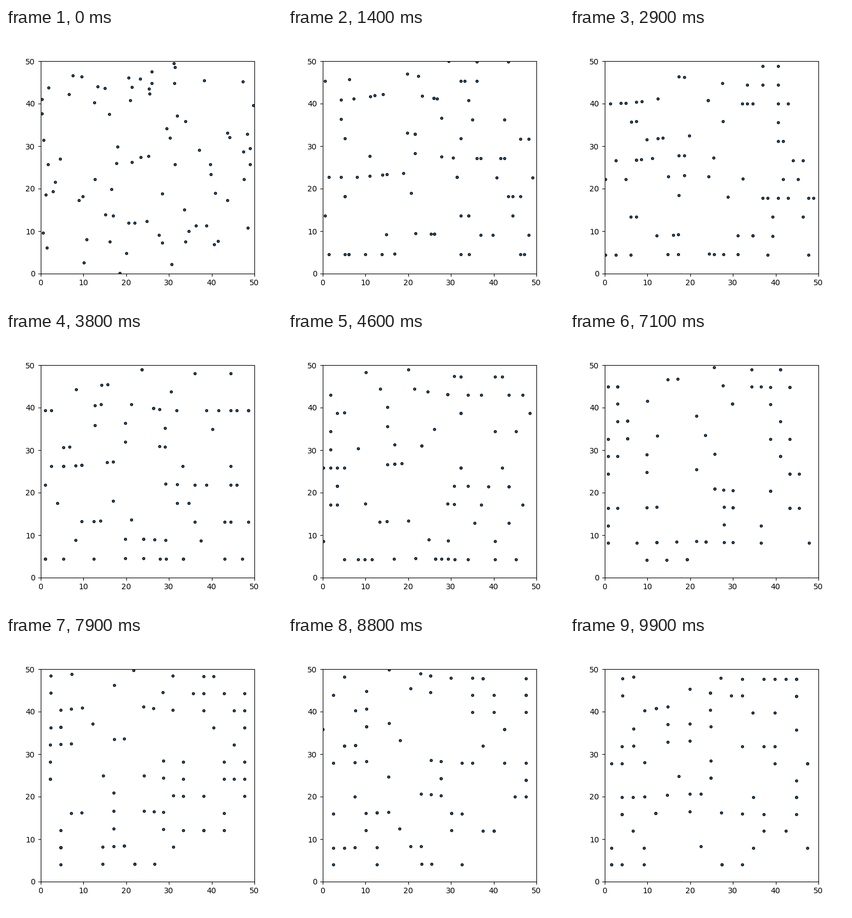
A matplotlib script for the animation above (10000 ms loop, 500x500 px).

```python
import numpy as np
import matplotlib.pyplot as plt
from matplotlib.animation import FuncAnimation

FRAMES = 100
INTERVAL = 100
SIZE = 50
COUNT = 80
SETTLE = 10  # frames until all dots sit on the grid

rng = np.random.default_rng(7)
start = rng.uniform(0, SIZE, (COUNT, 2))
steps = rng.normal(0, 1.5, (FRAMES, COUNT, 2))
steps[0] = 0
walk = start + np.cumsum(steps, axis=0)
walk = SIZE - np.abs(SIZE - walk % (2 * SIZE))  # bounce off the walls


def ease(u):
    return (1 - np.cos(np.pi * np.clip(u, 0, 1))) / 2


def swell(x, y):
    """A soft ridge, leaning left, that lifts the rows."""
    return np.exp(-((x - 22 + .12 * y) / 8) ** 2)


def grid(x, y, u):
    """Nearest crossing of a grid whose columns widen and rows close up."""
    col = .85 + 1.7 * u
    row = 4.56 - .59 * u
    last = np.floor(SIZE / col)
    gx = SIZE - col * np.clip(np.round((SIZE - x) / col), 1, last)
    gy = row * np.clip(np.round(y / row), 1, np.floor(SIZE / row))
    ridge = swell(gx, gy)
    return gx + .6 * ridge, gy * (1 + .043 * ridge)


def place(n):
    x, y = walk[n].T
    gx, gy = grid(x, y, ease(n / (FRAMES - 1)))
    snap = ease(n / SETTLE)
    return x + (gx - x) * snap, y + (gy - y) * snap


fig, ax = plt.subplots(figsize=(5, 5), dpi=100)
ax.set_xlim(0, SIZE)
ax.set_ylim(0, SIZE)
dots, = ax.plot([], [], "o", ms=3, mfc="C0", mec="black", mew=1)


def update(n):
    dots.set_data(*place(n))
    return dots,


anim = FuncAnimation(fig, update, frames=FRAMES, interval=INTERVAL,
                     repeat=True, repeat_delay=0)
plt.show()
```
